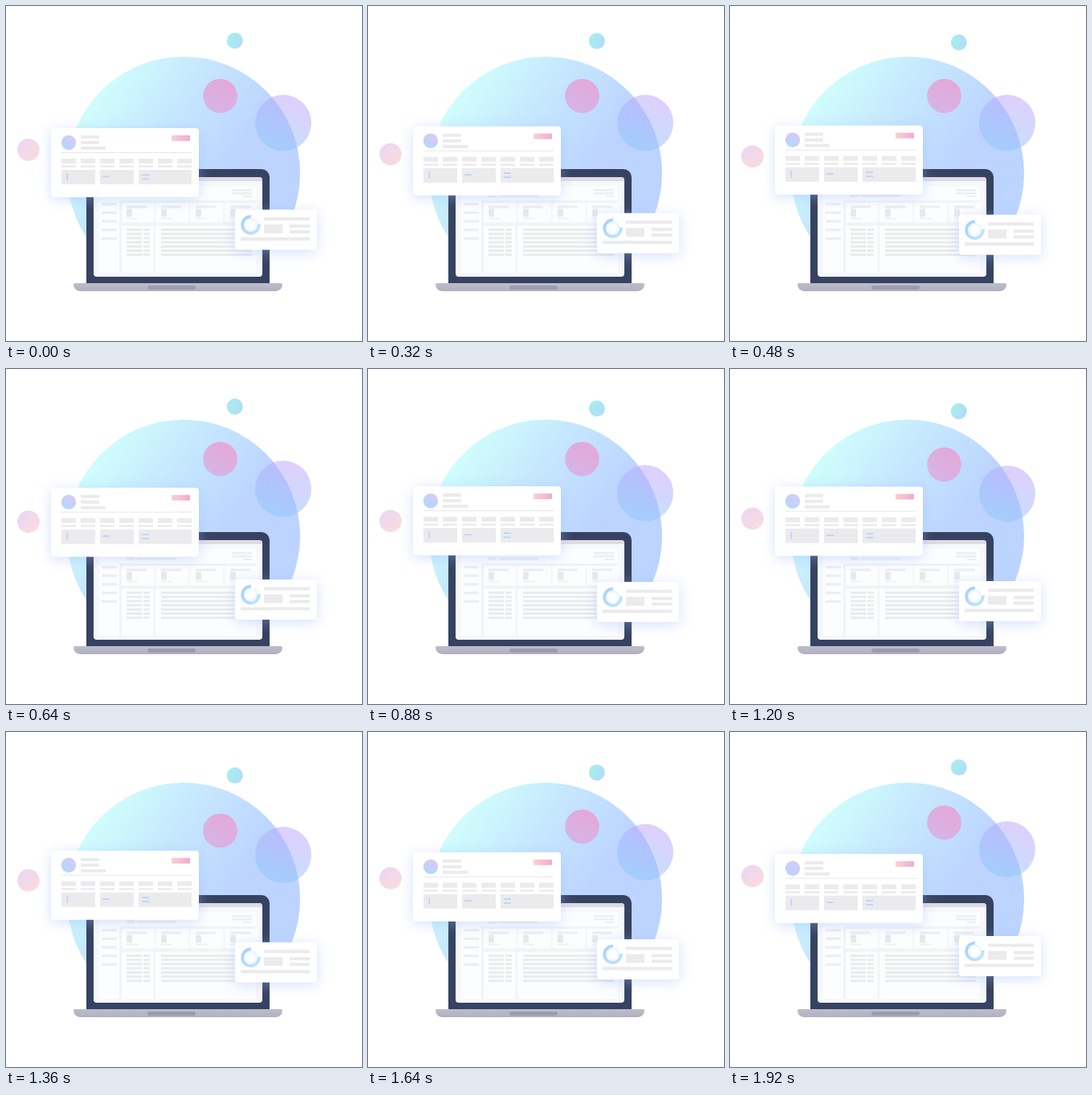
An HTML page with a canvas for the animation above (1.96 s loop, 443 by 417 pixels).

```html
<!DOCTYPE html>
<html lang="en">
<head>
<meta charset="utf-8">
<title>Floating dashboard</title>
<style>
html, body { margin: 0; width: 100%; height: 100%; overflow: hidden; background: #fff; }
canvas { display: block; }
</style>
</head>
<body>
<canvas id="stage" width="443" height="417"></canvas>
<script>
const ctx = document.getElementById('stage').getContext('2d');
const LOOP = 1960, STEP = 40, TAU = Math.PI * 2;
const GREY = '#ebebed', PALE = '#eceef0';

// Linear rise from start to peak, then linear return by the end of the loop.
function swing(t, start, peak, size) {
  if (t <= start) return 0;
  return t < peak ? size * (t - start) / (peak - start)
                  : size * (LOOP - t) / (LOOP - peak);
}

function gradient(x0, y0, x1, y1, ...colors) {
  const g = ctx.createLinearGradient(x0, y0, x1, y1);
  colors.forEach((c, i) => g.addColorStop(i / (colors.length - 1), c));
  return g;
}

function rect(x, y, w, h, fill = GREY) {
  ctx.fillStyle = fill;
  ctx.fillRect(x, y, w, h);
}

function round(x, y, w, h, r, fill) {
  ctx.fillStyle = fill;
  ctx.beginPath();
  ctx.roundRect(x, y, w, h, r);
  ctx.fill();
}

function disc(x, y, r, fill) {
  ctx.fillStyle = fill;
  ctx.beginPath();
  ctx.arc(x, y, r, 0, TAU);
  ctx.fill();
}

function bubble(x, y, r, dx, dy, a, b) {
  disc(x, y, r, gradient(x - dx * r, y - dy * r, x + dx * r, y + dy * r, a, b));
}

function cardBase(x, w, h) {
  ctx.save();
  ctx.shadowColor = 'rgba(150,180,255,0.42)';
  ctx.shadowBlur = 16;
  ctx.shadowOffsetY = 3;
  round(x, 0, w, h, 4, '#fff');
  ctx.restore();
}

function laptop() {
  round(100, 203, 228, 143, [10, 10, 0, 0], '#364261');
  ctx.save();
  ctx.beginPath();
  ctx.roundRect(109, 213, 210, 124, 4);
  ctx.clip();
  rect(109, 213, 210, 124, '#f6f8f9');
  rect(109, 213, 210, 5, '#dedae3');

  const panel = '#fcfdfe';
  rect(116, 224, 195, 18, panel);
  rect(116, 242, 25, 90, panel);
  rect(141, 242, 3, 90, '#f1f3f4');
  rect(144, 242, 167, 3, '#f1f3f4');
  rect(144, 269.5, 167, 4, '#f1f3f4');
  rect(183.5, 273, 2.5, 59, '#f1f3f4');
  rect(281, 228, 25, 2.5, PALE);
  rect(281, 232, 25, 2.5, PALE);
  rect(295, 236, 11, 2, PALE);
  rect(150, 234, 10, 4, PALE);
  rect(163, 235, 49, 2.5, PALE);

  for (let i = 0; i < 5; i++) rect(119, 245 + i * 10.7, 19, 3.2, PALE);
  for (let i = 0; i < 4; i++) {
    const x = 144 + i * 43;
    rect(x, 245, 40, 24.5, panel);
    rect(x + 6, 248.5, 25, 3, PALE);
    round(x + 6, 252.5, 7, 10, 1.5, '#e7e9eb');
    rect(x + 6, 263.8, 14, 1.5, PALE);
  }
  rect(144, 273.5, 39.5, 58.5, panel);
  rect(186, 273.5, 125, 58.5, panel);
  for (let i = 0; i < 7; i++) {
    const y = 277 + i * 5.2;
    rect(150, y, 19, 3, '#e9ebed');
    rect(171, y, 8, 3, '#e9ebed');
    rect(193, y, 113, 3, '#e9ebed');
  }
  ctx.restore();

  round(84, 345, 260, 10, [2, 2, 9, 9], gradient(0, 345, 0, 355, '#bdbdca', '#b0b0c0'));
  round(176, 348, 60, 5, 2.5, '#9c9cad');
}

function profileCard(y) {
  ctx.save();
  ctx.translate(0, y);
  cardBase(56, 184, 86);
  bubble(78, 18, 9.2, 0.5, -0.8, '#b4d6fd', '#d6cbf5');
  rect(93, 9, 23, 4);
  rect(93, 16, 23, 4);
  rect(93, 23, 31, 4);
  round(206, 9, 23, 7, 1, gradient(206, 0, 229, 0, '#fbd0cf', '#f0abd3'));
  rect(69, 30, 162, 1, '#e6e7ea');
  for (let i = 0; i < 7; i++) {
    rect(69 + i * 24, 38, 18, 6);
    rect(69 + i * 24, 46.5, 18, 2.5);
  }
  rect(69, 52, 42, 18);
  rect(117, 52, 42, 18);
  rect(165, 52, 66, 18);
  const accent = '#b8d5f6';
  rect(75.5, 56, 1.7, 9, accent);
  rect(120, 59.5, 9, 1.7, accent);
  rect(169, 57.5, 9, 1.7, accent);
  rect(169, 62.5, 9, 1.7, accent);
  ctx.restore();
}

function donut(x, y) {
  const glow = ctx.createRadialGradient(x, y, 4, x, y, 9.5);
  glow.addColorStop(0, '#fff');
  glow.addColorStop(1, '#e2f3ff');
  disc(x, y, 9, glow);
  ctx.lineWidth = 3.6;
  ctx.strokeStyle = gradient(x - 10, y - 10, x + 10, y + 8, '#a9cff9', '#bfe3fc');
  ctx.beginPath();
  ctx.arc(x, y, 10.4, -0.1, -Math.PI / 2 + TAU + 0.05);
  ctx.stroke();
}

function chartCard(y) {
  ctx.save();
  ctx.translate(0, y);
  cardBase(285, 102, 50);
  donut(304.5, 19);
  rect(321, 9.5, 57, 4);
  rect(321, 18.5, 23, 11);
  rect(353, 18.5, 25, 4);
  rect(353, 25.5, 25, 4);
  rect(292, 34.5, 86, 4);
  ctx.restore();
}

function draw(t) {
  rect(0, 0, 443, 417, '#fff');
  disc(221, 208, 145, gradient(115, 115, 265, 220, '#cffcfc', '#c5e6fe', '#bcd4ff'));
  bubble(345, 145.5 + swing(t, 480, 1015, 12), 35, -0.4, 0.9,
    'rgba(190,160,250,0.5)', 'rgba(140,200,250,0.52)');
  bubble(266.5, 112 + swing(t, 1080, 1290, 12), 21.3, -0.5, 0.8, '#e3a9d8', '#d6b4e6');
  bubble(284.8, 43.2 + swing(t, 280, 1440, 11.7), 10, 0.8, 0.5, '#a6eeee', '#b3dcf8');
  bubble(28, 179 + swing(t, 0, 690, 12), 13.8, 0.7, 0.7, '#ebd7f2', '#fbdadf');
  laptop();
  profileCard(152 - swing(t, 0, 1000, 6.8));
  chartCard(253.5 + swing(t, 0, 1000, 13.2));
}

const start = performance.now();
function frame() {
  const t = Math.max(0, performance.now() - start) % LOOP;
  draw(Math.floor(t / STEP) * STEP);
  requestAnimationFrame(frame);
}
frame();
</script>
</body>
</html>
```
